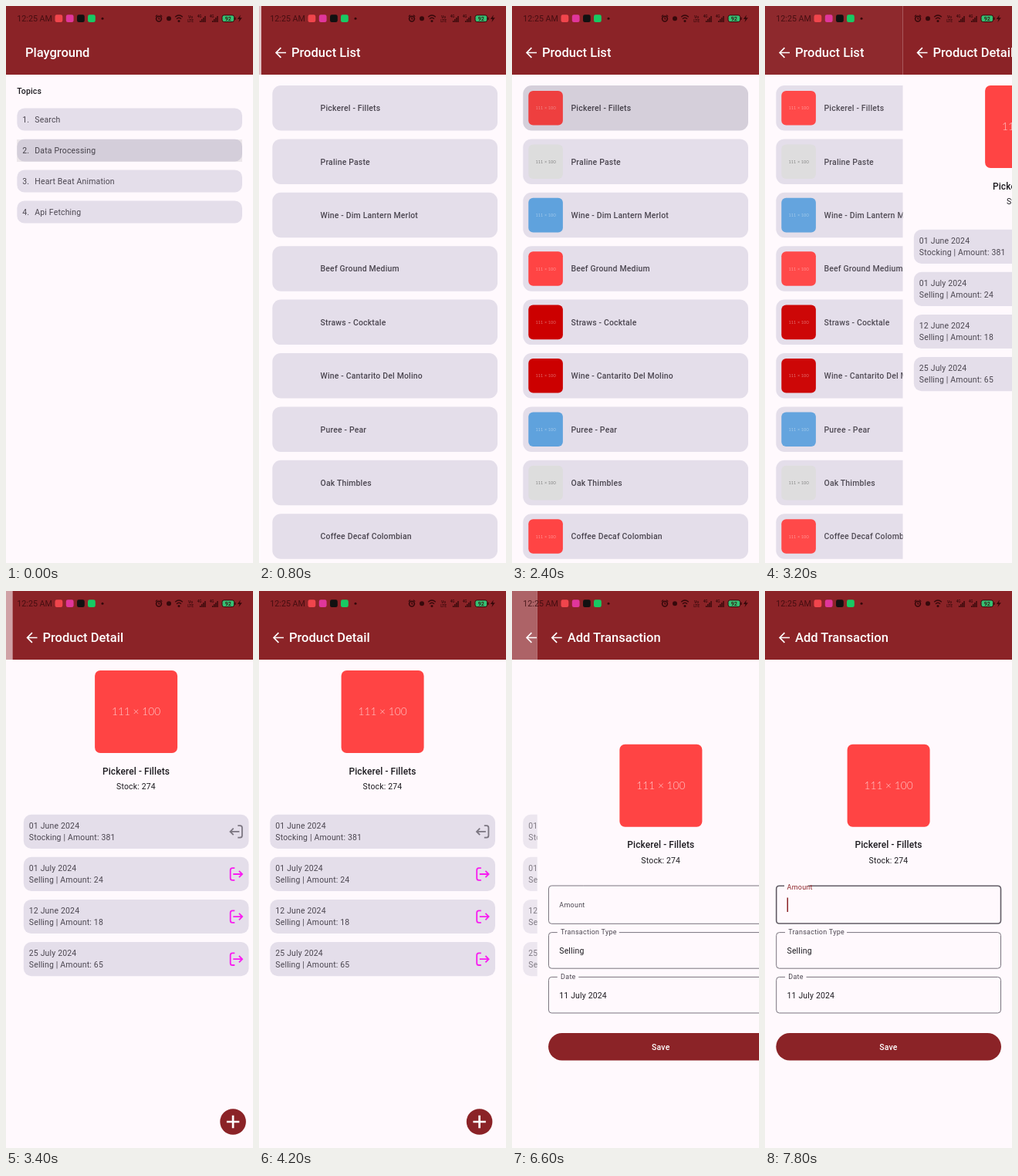
Write an HTML page that moves like this. It is 320x722 px and loops after 8 s.

```html
<!DOCTYPE html>
<html lang="en">
<head>
<meta charset="utf-8">
<title>Playground</title>
<style>
html, body { margin: 0; width: 100%; height: 100%; overflow: hidden; background: #fff9fd; }
svg { display: block; width: 100vw; height: 100vh; }
text { font-family: Roboto, "Noto Sans", sans-serif; white-space: pre; }
.title { font-size: 16.5px; font-weight: 500; fill: #fff; }
.body { font-size: 10.44px; letter-spacing: .0179em; fill: #4b4650; }
.strong { font-weight: 500; }
.dark { fill: #1d1b20; }
.name { font-size: 11.93px; letter-spacing: .0094em; font-weight: 500; fill: #1d1b20; }
.label { font-size: 8.95px; letter-spacing: .033em; fill: #4b4650; }
.thumb { font-family: Lato, sans-serif; font-weight: 300; }
.line { fill: none; stroke-linecap: butt; }
</style>
</head>
<body>
<svg id="stage" viewBox="0 0 320 722" preserveAspectRatio="none"></svg>
<script>
const RED = '#8b2327', BG = '#fff9fd', CARD = '#e4deea', INK = '#35090b';
const SIZE = { title: 16.5, body: 10.44, name: 11.93, label: 8.95 };

// Text is placed by the middle of its capitals.
const text = (x, mid, cls, str, extra = '') =>
  `<text x="${x}" y="${mid + SIZE[cls.split(' ')[0]] * .355}" class="${cls}" ${extra}>${str}</text>`;
const centred = (mid, cls, str, extra = '') =>
  text(160, mid, cls, str, 'text-anchor="middle" ' + extra);
const box = (x, y, w, h, r, fill, extra = '') =>
  `<rect x="${x}" y="${y}" width="${w}" height="${h}" rx="${r}" fill="${fill}" ${extra}/>`;
const line = (d, color, width, extra = '') =>
  `<path class="line" d="${d}" stroke="${color}" stroke-width="${width}" ${extra}/>`;
const press = (id, x, y, w, h, r) => box(x, y, w, h, r, '#000', `id="${id}" opacity="0"`);

const thumb = (x, y, w, fill, ink) =>
  box(x, y, w, w, w > 60 ? 7 : 6, fill) +
  `<text x="${x + w / 2}" y="${y + w * .545}" class="thumb" font-size="${w * .128}" fill="${ink}"
    fill-opacity=".72" text-anchor="middle">111 × 100</text>`;

const page = (id, title, back, content) => `<g id="${id}">
  ${box(0, 0, 320, 722, 0, BG)}${box(0, 0, 320, 89, 0, RED)}
  ${back ? line('M32 60.5H19.6M25.4 54.2L19.1 60.5L25.4 66.8', '#fff', 1.7) : ''}
  ${text(back ? 39 : 25, 60.5, 'title', title)}${content}</g>`;

function home() {
  const topics = ['Search', 'Data Processing', 'Heart Beat Animation', 'Api Fetching'];
  return text(14.3, 110.5, 'body strong dark', 'Topics') + topics.map((name, i) => {
    const y = 132.5 + i * 40;
    return box(14.3, y, 291.7, 29, 9.5, CARD) +
      text(21.3, y + 14.5, 'body', i + 1 + '.') + text(37.3, y + 14.5, 'body', name);
  }).join('') + press('pressTopic', 14, 173, 292, 29, 0);
}

function list() {
  const red = ['#ff4444', '#fff'], grey = ['#dddddd', '#000'],
    blue = ['#5fa2dd', '#fff'], deep = ['#cc0000', '#fff'];
  const items = [
    ['Pickerel - Fillets', red], ['Praline Paste', grey], ['Wine - Dim Lantern Merlot', blue],
    ['Beef Ground Medium', red], ['Straws - Cocktale', deep], ['Wine - Cantarito Del Molino', deep],
    ['Puree - Pear', blue], ['Oak Thimbles', grey], ['Coffee Decaf Colombian', red]
  ];
  const top = i => 103 + i * 69.4;
  return items.map(([name], i) => box(14.3, top(i), 291.7, 58.5, 11, CARD) +
      text(76.5, top(i) + 29.4, 'body strong', name)).join('') +
    `<g id="thumbs">${items.map(([, c], i) => thumb(21.3, top(i) + 7, 44.6, ...c)).join('')}</g>` +
    press('pressItem', 14.3, 103, 291.7, 58.5, 11);
}

const product = y => thumb(106.6, y, 107, '#ff4444', '#fff') +
  centred(y + 130.3, 'name', 'Pickerel - Fillets') + centred(y + 150.3, 'body dark', 'Stock: 274');

function detail() {
  const moves = [['01 June 2024', 'Stocking', 381], ['01 July 2024', 'Selling', 24],
    ['12 June 2024', 'Selling', 18], ['25 July 2024', 'Selling', 65]];
  const icon = (y, inward) => line(
    'M-2 -7.8H-5Q-7.6 -7.8 -7.6 -5.2V5.2Q-7.6 7.8 -5 7.8H-2M-4 0H7.4M3.6 -4.2L7.8 0L3.6 4.2',
    inward ? '#7b7681' : '#f81cf0', 1.8,
    `transform="translate(289.8 ${y}) scale(${inward ? -1 : 1} 1)"`);
  return product(103) + moves.map(([date, kind, n], i) => {
    const y = 289.7 + i * 55.1;
    return box(14.3, y, 291.7, 44.2, 10, CARD) + text(21.3, y + 14.5, 'body', date) +
      text(21.3, y + 29.6, 'body', `${kind} | Amount: ${n}`) + icon(y + 22.2, !i);
  }).join('') +
  `<circle cx="285.6" cy="688" r="16.8" fill="${RED}"/>` +
  line('M277.4 688H293.8M285.6 679.8V696.2', '#fff', 2.7) +
  press('pressAdd', 266, 668, 40, 40, 0);
}

// Outlined field with a gap in its top edge from a to b.
const outline = (y, h, a, b, color, width) => line(
  `M${a} ${y}H18.5Q14.7 ${y} 14.7 ${y + 4}V${y + h - 4}Q14.7 ${y + h} 18.5 ${y + h}` +
  `H301.5Q305.5 ${y + h} 305.5 ${y + h - 4}V${y + 4}Q305.5 ${y} 301.5 ${y}H${b}`, color, width);

function form() {
  const edge = '#79747e';
  const field = (y, gap, label, value) => outline(y, 46.6, 26, gap, edge, 1) +
    text(30.3, y - 1, 'label', label) + text(28.5, y + 23.4, 'body dark', value);
  return product(198.7) +
    `<g id="idle">${outline(382, 49.3, 60, 60, edge, 1)}${text(28.5, 407, 'label', 'Amount')}</g>` +
    `<g id="focus">${outline(382.3, 48.7, 25, 56, '#625d66', 1.6)}
      ${text(28.5, 384, 'label', 'Amount', `style="fill:${RED}"`)}
      ${box(28.5, 397.5, 1.5, 18.5, 0, RED)}</g>` +
    field(442.6, 106, 'Transaction Type', 'Selling') + field(500.4, 53.5, 'Date', '11 July 2024') +
    box(14.3, 573, 291.7, 35.5, 17.75, RED) + centred(590.8, 'body strong', 'Save', 'style="fill:#fff"');
}

function statusBar() {
  const tiny = (x, y, size, str) =>
    `<text x="${x}" y="${y}" font-size="${size}" font-weight="500" text-anchor="middle" fill="${INK}">${str}</text>`;
  const signal = x => tiny(x - 2.5, 15, 4.6, '4G') +
    [0, 1, 2, 3].map(i => box(x - 2 + i * 2.1, 19 - i * 2, 1.4, 2 + i * 2, 0, INK)).join('');
  const apps = [[63.5, '#f0454c'], [77.8, '#e0369b'], [92, '#111'], [106, '#18c963']];
  return `<text x="14.3" y="20.2" font-size="10.7" fill="${INK}" fill-opacity=".8">12:25 AM</text>` +
    apps.map(([x, c]) => box(x, 11.3, 9.8, 9.8, 2.4, c)).join('') +
    `<circle cx="125" cy="16.2" r="1.5" fill="${INK}"/>
     <circle cx="198" cy="16.6" r="3.4" fill="none" stroke="${INK}" stroke-width="1.6"/>
     <circle cx="211" cy="16.2" r="3" fill="${INK}"/>` +
    line('M198 14.6V17H199.6M193.8 13.6L196 11.6M200 11.6L202.2 13.6', INK, 1.2) +
    line('M219.2 14.2Q224 9.8 228.8 14.2M221 16.7Q224 13.8 227 16.7', INK, 1.3) +
    `<circle cx="224" cy="19.4" r="1.5" fill="${INK}"/>` +
    tiny(239, 15.6, 5, 'Vo') + tiny(239, 20.8, 4.8, 'LTE') + signal(253) + signal(269) +
    box(280, 11.9, 15.6, 8.6, 2.4, '#35c173', `stroke="${INK}" stroke-width="1"`) +
    box(296.4, 14.4, 1.3, 3.6, .6, INK) + tiny(287.8, 18.8, 7, '92') +
    `<path d="M303.8 11.4L299.8 16.9H302.4L301.4 21L305.8 15.2H303Z" fill="${INK}"/>`;
}

const $ = id => document.getElementById(id);
$('stage').innerHTML = page('home', 'Playground', false, home()) +
  page('list', 'Product List', true, list()) +
  page('detail', 'Product Detail', true, detail()) +
  page('form', 'Add Transaction', true, form()) + statusBar();

const LOOP = 8000, STEP = 200, FADE = 700;
// [page, first visible tick, start of its slide]
const route = [['home', 0, -2000], ['list', 800, 465], ['detail', 3200, 3125], ['form', 6600, 6407]];
// [overlay, steps of [time, opacity]]
const presses = [
  ['pressTopic', [[0, .07], [400, .035], [600, 0]]],
  ['pressItem', [[0, 0], [2400, .065], [3000, .03], [3200, 0]]],
  ['pressAdd', [[0, 0], [5600, .09], [6200, .045], [6400, 0]]]
];

// Critically damped spring: share of the way still to go.
const spring = ms => { const x = ms * .02; return (1 + x) * Math.exp(-x); };

// cubic-bezier(.4, 0, .2, 1)
function ease(p) {
  if (p <= 0 || p >= 1) return Math.min(Math.max(p, 0), 1);
  let lo = 0, hi = 1, s = .5;
  for (let i = 0; i < 24; i++) {
    s = (lo + hi) / 2;
    const x = 1.2 * s * (1 - s) ** 2 + .6 * s * s * (1 - s) + s ** 3;
    if (x < p) lo = s; else hi = s;
  }
  return 3 * s * s - 2 * s ** 3;
}

function draw(now) {
  const t = Math.floor(now % LOOP / STEP) * STEP;
  route.forEach(([id, from, start], i) => {
    const next = route[i + 1], el = $(id);
    el.style.display = t < from ? 'none' : '';
    el.setAttribute('transform', `translate(${320 * spring(t - start)} 0)`);
    el.setAttribute('opacity', next && t >= next[1] ? 1 - ease((t - next[2]) / FADE) : 1);
  });
  for (const [id, steps] of presses)
    $(id).setAttribute('opacity', steps.filter(s => s[0] <= t).pop()[1]);
  $('thumbs').style.display = t < 1400 ? 'none' : '';
  $('idle').style.display = t < 7800 ? '' : 'none';
  $('focus').style.display = t < 7800 ? 'none' : '';
}

const begin = performance.now();
function frame() {
  draw(performance.now() - begin);
  requestAnimationFrame(frame);
}
frame();
</script>
</body>
</html>
```
